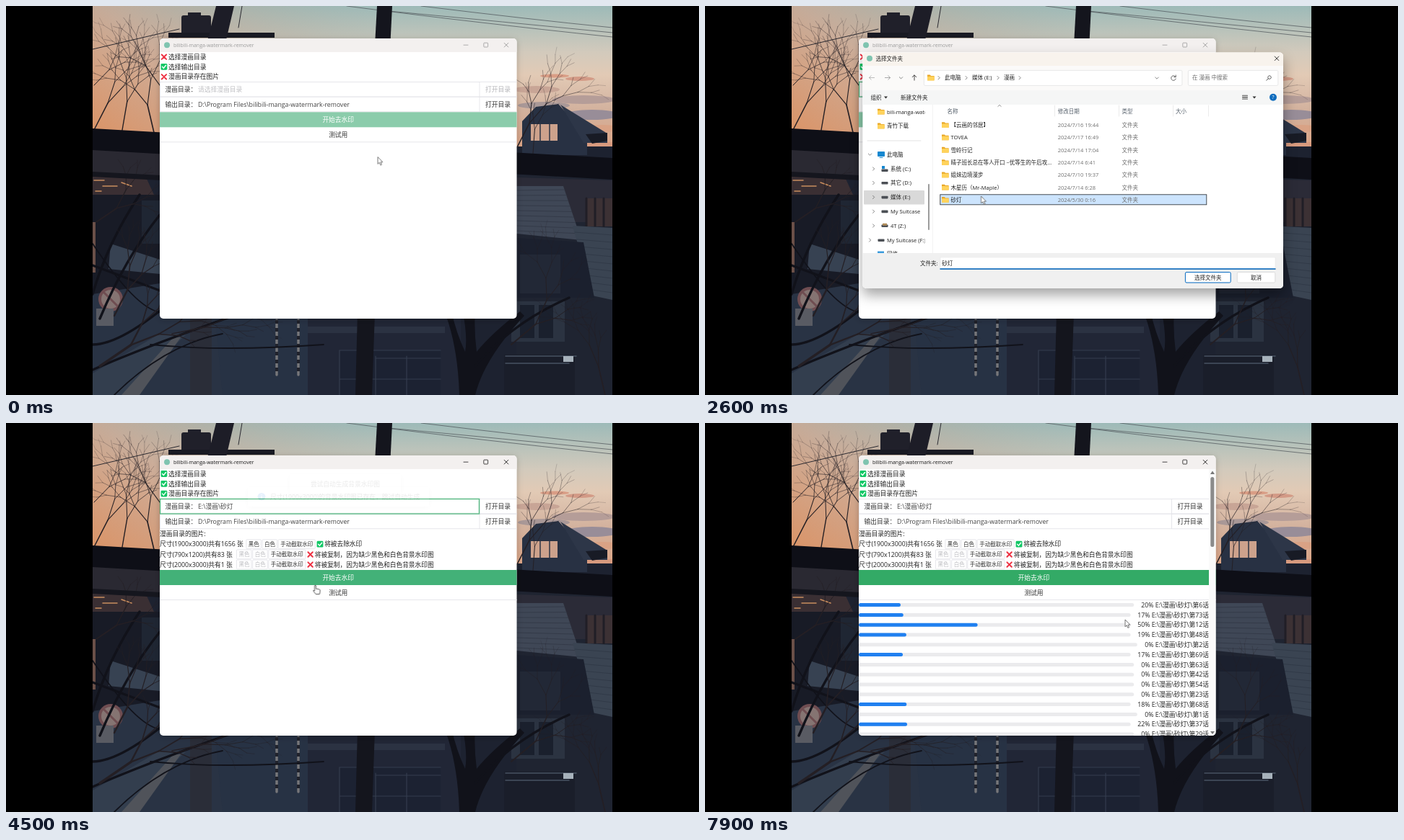
An HTML page for the animation above (8 s loop, 960 by 540 pixels).

```html
<!DOCTYPE html>
<html lang="zh-CN">
<head>
<meta charset="utf-8">
<title>bilibili-manga-watermark-remover</title>
<style>
html, body { margin: 0; width: 100%; height: 100%; overflow: hidden; background: #000; }
svg { display: block; width: 960px; height: 540px; }
text { font-family: "Open Sans", "Noto Sans CJK SC", "Noto Sans CJK", sans-serif; }
.anim { animation: 8s infinite; }
#dialog { transform-origin: 509.7px 228.3px; }
</style>
</head>
<body>
<svg id="stage" viewBox="0 0 960 540"></svg>
<script>
const LOOP = 8000, TICK = 100;
const BOOK = '砂灯';
let css = '';

// --- timeline: every segment advances in whole ticks
function timeline(id, stops) {
  const frames = stops.map(([ms, decl], i) => {
    const next = stops[i + 1] ? stops[i + 1][0] : LOOP;
    const n = Math.max(1, Math.round((next - ms) / TICK));
    return `${ms / LOOP * 100}%{${decl};animation-timing-function:steps(${n},end)}`;
  });
  css += `@keyframes ${id}{${frames.join('')}}#${id}{animation-name:${id}}`;
}
function show(id, from, to) {
  const stops = [[0, `opacity:${from ? 0 : 1}`]];
  if (from) stops.push([from - TICK, 'opacity:0'], [from, 'opacity:1']);
  if (to < LOOP) stops.push([to - TICK, 'opacity:1'], [to, 'opacity:0']);
  stops.push([LOOP, `opacity:${to < LOOP ? 0 : 1}`]);
  timeline(id, stops);
}

// --- drawing helpers
const anim = (id, body) => `<g id="${id}" class="anim">${body}</g>`;
const rect = (x, y, w, h, fill, extra = '') => `<rect x="${x}" y="${y}" width="${w}" height="${h}" fill="${fill}" ${extra}/>`;
const poly = (points, fill, extra = '') => `<polygon points="${points}" fill="${fill}" ${extra}/>`;
const line = (d, stroke, w = 1) => `<path d="${d}" fill="none" stroke="${stroke}" stroke-width="${w}" stroke-linecap="round"/>`;
const disc = (x, y, r, fill) => `<circle cx="${x}" cy="${y}" r="${r}" fill="${fill}"/>`;
const text = (x, cy, s, size = 8.75, fill = '#222', anchor = 'start') =>
  `<text x="${x}" y="${(cy + size * .37).toFixed(2)}" font-size="${size}" fill="${fill}" text-anchor="${anchor}">${s}</text>`;
const small = (x, cy, s, fill = '#222', anchor) => text(x, cy, s, 7.5, fill, anchor);
const clip = (id, x, y, w, h, r = 0) => `<clipPath id="${id}"><rect x="${x}" y="${y}" width="${w}" height="${h}" rx="${r}"/></clipPath>`;
const clipped = (id, body) => `<g clip-path="url(#${id})">${body}</g>`;
const close = (x, y, c, r = 3) => line(`M${x - r},${y - r}l${2 * r},${2 * r}m0,${-2 * r}l${-2 * r},${2 * r}`, c, .9);
const yes = (x, y) => rect(x, y - 4.4, 8.8, 8.8, '#12c765', 'rx="1.4"') + line(`M${x + 2},${y}l1.8,2l3.2,-4`, '#fff', 1.4);
const no = (x, y) => line(`M${x + 1.2},${y - 3}l6.4,6.4m0,-6.4l-6.4,6.4`, '#ee3344', 2);
const folder = (x, y) => `<path d="M${x},${y - 4}h3.8l1.2,1.3h4.6v6.4h-9.6z" fill="#e9a828"/>` + rect(x, y - 1.8, 9.6, 5.6, '#ffd35c', 'rx=".6"');
const chevron = (x, y, down) => line(down ? `M${x - 2.2},${y - 1}l2.2,2.2l2.2,-2.2` : `M${x - 1},${y - 2.2}l2.2,2.2l-2.2,2.2`, '#666', .8);

// --- scenery
let seed = 11;
const rand = () => (seed = seed * 16807 % 2147483647) / 2147483647;
function branch(x, y, angle, len, w) {
  if (len < 10) return '';
  const x2 = x + Math.cos(angle) * len, y2 = y + Math.sin(angle) * len;
  const fork = d => branch(x2, y2, angle + d * (.15 + rand() * .35), len * (.62 + rand() * .25), w * .7);
  return line(`M${x.toFixed(1)},${y.toFixed(1)}L${x2.toFixed(1)},${y2.toFixed(1)}`, '#241f24', w.toFixed(2)) + fork(-1) + fork(1);
}
function scenery() {
  const ink = '#11121a';
  let s = rect(120, 0, 720, 240, 'url(#sky)') + rect(120, 0, 400, 240, 'url(#glow)');
  // clouds
  const cloud = (x, y, rx, ry, c) => `<ellipse cx="${x}" cy="${y}" rx="${rx}" ry="${ry}" fill="${c}"/>`;
  s += cloud(760, 97, 20, 2.5, '#d99d85') + cloud(795, 101, 20, 3, '#d39a86') + cloud(735, 116, 32, 5, '#c8a596')
    + cloud(800, 130, 44, 6, '#b59d98') + cloud(745, 138, 36, 5, '#a99897') + cloud(812, 151, 38, 7, '#988d98')
    + cloud(825, 170, 30, 5, '#d9a285') + cloud(820, 194, 32, 6, '#d79a7e');
  // wires, transformer, poles
  s += line('M472,0Q640,22 840,43M530,7Q690,22 840,37M575,0Q720,18 840,30', '#4a5055', .7);
  s += rect(243, 13, 41, 31, '#20202a', 'rx="3"') + rect(252, 9, 18, 6, '#20202a') + rect(225, 37, 147, 7, '#191a23')
    + poly('291,0 316,0 302,60 276,60', '#1d1d27') + line('M327,0l-5,30M120,60L240,32', '#2a2930', 1);
  s += poly('514,0 535,0 508,540 484,540', '#14151d');
  // ground and houses
  s += rect(120, 195, 720, 345, '#1d2230') + poly('120,198 240,207 240,242 120,232', '#2a2932')
    + poly('120,232 195,240 205,262 120,264', '#3a2f33')
    + line('M122,242h14M134,250h20M160,245l14,5M124,257h8', '#c98d5d', 1.5)
    + poly('120,262 213,262 213,400 120,400', '#181b26') + poly('145,330 213,352 213,372 142,365', '#374252')
    + rect(120, 300, 4, 70, '#6b5048') + rect(188, 270, 25, 60, '#1f2633')
    + poly('120,400 213,385 300,434 420,434 420,540 120,540', '#293344')
    + poly('120,510 213,455 250,455 165,540 120,540', '#333e4e') + poly('160,540 232,460 242,460 185,540', '#50535a')
    + poly('290,434 420,434 420,540 300,540', '#273244');
  s += disc(145, 407, 17, '#6f4d51') + disc(145, 407, 13, '#857472') + line('M136,398l18,18', '#6f4d51', 3) + rect(125, 420, 24, 24, '#595b63');
  s += rect(255, 430, 30, 110, '#2a2d38');
  for (const x of [375, 405]) s += line(`M${x},436V512`, '#77777a', 3.4) + `<path d="M${x},436V512" stroke="#20222b" stroke-width="4" stroke-dasharray="5 6"/>`;
  s += rect(418, 434, 212, 106, '#212636') + rect(418, 445, 190, 9, '#2b3242') + rect(462, 478, 140, 62, '#1c2232')
    + line('M462,540V478H602M512,486V540M555,486V540M462,518H602M512,489H602', '#343d4e', 1.2) + poly('487,425 511,425 507,540 484,540', '#14151d');
  // right side
  s += rect(707, 235, 133, 305, '#1f2431') + poly('707,238 840,242 840,300 780,300 707,262', '#2b2b37')
    + poly('734,140 765,136 805,180 805,207 715,207 715,160', '#283143') + rect(727, 164, 37, 23, '#cda28c') + line('M740,164V187M753,164V187', '#2c3444', 1.5)
    + poly('768,137 833,177 833,190 800,190', '#2d3648') + poly('803,178 833,176 833,187 812,191', '#181b25')
    + poly('707,250 772,250 797,325 707,316', '#3f4756');
  for (let i = 0; i < 9; i++) s += line(`M707,${256 + i * 7}L${774 + i * 2.4},${255 + i * 7.6}`, '#313846', .8);
  s += rect(804, 267, 36, 39, '#3c3134') + line('M804,267V306M816,267V306M828,267V306', '#201e26', 3)
    + poly('785,305 840,308 840,408 812,402', '#3a4452');
  for (let i = 0; i < 9; i++) s += line(`M${788 + i * 3},${314 + i * 10}L840,${318 + i * 10}`, '#2f3846', .8);
  s += poly('707,322 800,328 815,405 707,405', '#1b202e') + rect(712, 345, 56, 54, '#222836')
    + rect(700, 410, 74, 56, '#2b3341') + rect(712, 415, 20, 46, '#1a202d') + rect(738, 415, 20, 46, '#1a202d')
    + rect(690, 484, 98, 56, '#1a1e2a') + line('M692,486H790M692,496H780', '#485363', 1.5) + rect(772, 486, 14, 8, '#a7b2bb');
  // trees
  s += `<path d="M606,420Q626,470 628,540H650Q662,490 718,430L712,424Q672,455 652,480Q648,450 650,420H632Q640,460 636,480Q624,455 616,420z" fill="${ink}"/>`;
  s += line('M650,500Q700,440 780,405M120,505Q200,470 330,425M120,470Q160,470 235,405M130,434Q165,350 213,290M120,400Q140,330 185,262M120,360L213,395', ink, 3.4)
    + line('M150,540Q220,470 300,455M200,470Q300,480 440,470M120,330Q180,420 213,425', ink, 1.8);
  for (const [x, y, a, len, w] of [[122, 172, -1.1, 42, 1.5], [160, 178, -1.4, 46, 1.4], [206, 180, -1.8, 44, 1.6], [213, 110, -2.2, 34, 1.2],
    [122, 110, -.8, 30, 1], [706, 200, -1.1, 42, 1.5], [730, 205, -1.5, 34, 1], [150, 430, -1.1, 40, 2.4], [125, 300, -.6, 34, 2],
    [130, 500, -.6, 52, 3.4], [230, 455, -.2, 46, 1.6], [700, 470, -.7, 44, 2], [830, 540, -1.8, 40, 1.6]]) s += branch(x, y, a, len, w);
  // crossing beam
  s += poly('120,170 840,211 840,241 120,200', '#0e0f17') + rect(120, 230, 95, 7, '#15161e', 'transform="rotate(3 120 230)"');
  return clipped('picture', s);
}

// --- main window
const DIM = '#9b9b9b', BORDER = '#e0e0e6';
function titleBar(color) {
  return text(232, 54.3, 'bilibili-manga-watermark-remover', 7, color)
    + line('M634,54.2h6', color, .8) + rect(661.8, 51.2, 5.8, 5.8, 'none', `stroke="${color}" stroke-width=".8" rx=".8"`) + close(693, 54.2, color, 2.8);
}
const checks = mark => ['选择漫画目录', '选择输出目录', '漫画目录存在图片']
  .map((s, i) => (i === 1 ? yes : mark)(214.5, 70.5 + i * 13.8) + text(225, 70.5 + i * 13.8, s)).join('');
function field(y, right, label, value, ready = true) {
  return rect(213.4, y, right - 51.5 - 213.4, 20.6, '#fff', `stroke="${BORDER}" stroke-width=".8"`) + line(`M${right - 51},${y + 20.6}H${right}M${right - 51},${y}H${right}`, BORDER, .8)
    + text(220.5, y + 10.3, label, 8.75, '#333') + text(266, y + 10.3, value, 8.75, ready ? '#444' : '#c0c0c4')
    + text(right - 26, y + 10.3, '打开目录', 8.75, ready ? '#333' : '#b4b4b8', 'middle');
}
const fields = (right, path, ready) => field(105.4, right, '漫画目录：', path, ready)
  + field(126.2, right, '输出目录：', 'D:\\Program Files\\bilibili-manga-watermark-remover');
function actions(y, right, color, id = '') {
  const mid = (213 + right) / 2;
  return `<rect x="213" y="${y}" width="${right - 213}" height="21" fill="${color}" ${id && `id="${id}" class="anim"`}/>`
    + text(mid, y + 10.3, '开始去水印', 8.75, '#fff', 'middle') + text(mid, y + 31.3, '测试用', 8.75, '#333', 'middle')
    + line(`M213,${y + 41.5}H${right}`, BORDER, .8);
}
function sizeRow(cy, label, x, ok) {
  const tag = (dx, s, w, on) => rect(x + dx, cy - 6.4, w, 12.8, '#fff', `stroke="${BORDER}" stroke-width=".8" rx="1"`) + small(x + dx + 3, cy, s, on ? '#333' : '#bcbcc0');
  const msg = ok ? '将被去除水印' : '将被复制，因为缺少黑色和白色背景水印图';
  return text(213, cy, label) + tag(0, '黑色', 20.5, ok) + tag(22.3, '白色', 20.5, ok) + tag(44.4, '手动截取水印', 51, true)
    + (ok ? yes : no)(x + 97.8, cy) + text(x + 108.4, cy, msg, 8.68);
}
const sizes = () => text(213, 154, '漫画目录的图片:') + sizeRow(168.2, '尺寸(1900x3000)共有1656 张', 332.8, true)
  + sizeRow(182.3, '尺寸(790x1200)共有83 张', 319.4) + sizeRow(196.4, '尺寸(2000x3000)共有1 张', 319.4);

// chapter, percent, drawn share of the bar
const jobs = [[6, 20, .152], [73, 17, .164], [12, 50, .437], [48, 19, .175], [2, 0, 0], [69, 17, .162], [63, 0, 0],
  [42, 0, 0], [54, 0, 0], [23, 0, 0], [68, 18, .176], [1, 0, 0], [37, 22, .178], [29, 0, 0]];
const jobLabel = (chapter, pct) => `${pct}% E:\\漫画\\${BOOK}\\第${chapter}话`;
const jobRows = () => jobs.map(([chapter], i) => {
  const cy = 252.6 + i * 13.8;
  return rect(213, cy - 2.5, 380, 5, '#ebebed', 'rx="2.5" class="track"') + rect(213, cy - 2.5, 0, 5, '#2080f0', 'rx="2.5" class="fill"')
    + text(698, cy, jobLabel(chapter, 0), 8.75, '#222', 'end').replace('<text', '<text class="job"');
}).join('');
const scrollBar = () => rect(698, 64, 10, 370, '#fafafa') + rect(700.3, 75, 5, 97, '#8b8b8b', 'rx="2.5"')
  + poly('700,71 706,71 703,66.5', '#777') + poly('700,428 706,428 703,432', '#777');

const toast = (x, w, body) => rect(x, 71, w, 26.6, '#fff', 'rx="2" filter="url(#soft)"') + body;
function notice(y, size) {
  return rect(472, y, 226, 85, '#fff', 'rx="2" filter="url(#soft)"') + disc(490.5, y + 17.6, 7, '#f0a020') + line(`M490.5,${y + 13.8}v4.4m0,3v.1`, '#fff', 1.5)
    + text(506.5, y + 17, `自动生成背景水印图(${size})失败`, 10, '#333') + close(684, y + 15.6, '#666')
    + small(506.5, y + 36.2, `找不到尺寸为(${size})的黑色背景水印图`, '#767c82') + small(506.5, y + 47.8, `找不到尺寸为(${size})的白色背景水印图`, '#767c82')
    + text(506.5, y + 67.6, '请尝试手动截取水印', 8.75, '#333');
}
function mainWindow() {
  const path = `E:\\漫画\\${BOOK}`;
  const idle = checks(no) + fields(707.5, '请选择漫画目录', false) + actions(147.3, 707.5, '#8bccab');
  const ready = checks(yes) + fields(707.5, path) + sizes() + actions(204, 707.5, '#18a058', 'start');
  const running = checks(yes) + fields(698, path) + sizes() + actions(204, 698, '#33aa66') + jobRows() + scrollBar();
  const focus = rect(213.5, 105.4, 442, 20.6, 'none', 'stroke="#18a058" stroke-opacity=".2" stroke-width="2.4"')
    + rect(213.5, 105.4, 442, 20.6, 'none', 'stroke="#36ad6a" stroke-width=".8"');
  return rect(213, 45, 494.5, 389, '#fff', 'rx="5" filter="url(#soft)"') + clipped('window', rect(213, 45, 495, 19, '#f3f0ef') + disc(223, 54.3, 4, '#7fc4b0')
    + anim('inactive', titleBar(DIM)) + anim('active', titleBar('#1b1b1b'))
    + anim('idle', idle) + anim('ready', ready) + anim('focus', focus) + anim('running', rect(213, 64, 495, 370, '#fff') + running)
    + anim('trying', toast(393, 154, text(470, 84.3, '尝试自动生成背景水印图', 8.75, '#444', 'middle')))
    + anim('exists', toast(335, 251, disc(354, 84.3, 5.4, '#2080f0') + line('M354,83.6v3m0,-5.2v.1', '#fff', 1.2)
      + text(366, 84.3, '尺寸(1900x3000)的背景水印图已存在，跳过自动生成', 8.75, '#444')))
    + anim('notice1', notice(249, '790x1200')) + anim('notice2', notice(342, '2000x3000')));
}

// --- folder dialog
const row = i => 165.2 + i * 17.32;
const fileRow = (i, name, date) => folder(328, row(i)) + small(340.5, row(i), name) + small(488.7, row(i), date, '#6f6f6f') + small(577.5, row(i), '文件夹', '#6f6f6f');
const drive = (x, y) => rect(x, y - 1.6, 9, 3.6, '#4b4f55', 'rx=".8"');
const crumb = (x, s) => small(x, 99.7, s);
function sidebar() {
  const disks = [['系统 (C:)', 226], ['其它 (D:)', 245.6], ['媒体 (E:)', 265.4], ['My Suitcase', 285.2], ['4T (Z:)', 305]];
  return rect(220, 256, 84, 19.4, '#d9d9d9', 'rx="1"') + folder(239, 146.8) + small(252, 146.8, 'bili-manga-watermark') + folder(239, 166.6) + small(252, 166.6, '青竹下载')
    + line('M225,187H299', '#dcdcdc', .8) + chevron(228.5, 206, true) + rect(239, 202, 10, 7, '#1688d0', 'rx=".8"') + line('M242,210.4h4', '#1688d0', 1) + small(252, 206, '此电脑')
    + disks.map(([s, y]) => chevron(233.5, y) + drive(244.5, y + (y === 226 ? 2 : 0)) + small(257, y, s)).join('') + rect(245, 222, 4, 4, '#1688d0')
    + rect(246, 301.8, 6, 3, '#b08c5a') + chevron(228.5, 325) + drive(239.5, 325) + small(252, 325, 'My Suitcase (F:)') + rect(239, 340.5, 9, 6, '#3a9bdc') + small(252, 344.4, '网络');
}
function dialog() {
  const books = [['【云画的邻居】', '2024/7/16 19:44'], ['TOVEA', '2024/7/17 16:49'], ['雪岭行记', '2024/7/14 17:04'], ['晴子班长总在等人开口 ~优等生的午后攻...', '2024/7/14 6:41'],
    ['姐妹边境漫步', '2024/7/10 19:37'], ['木星历（Mr-Maple）', '2024/7/14 6:28'], [BOOK, '2024/5/30 0:16']];
  const chapters = Array.from({ length: 11 }, (_, i) => fileRow(i, `第${i + 1}话`, '2024/5/26 6:01')).join('');
  const picked = rect(325.8, 261.8, 369, 14, '#cce4fd', 'stroke="#34393f" stroke-width=".9"');
  const nav = (x, d, c) => line(`M${x},99.5${d}`, c, .9);
  const left = 'm-3.6,0h7.2m-7.2,0l2.8,-2.8m-2.8,2.8l2.8,2.8', right = 'm3.6,0h-7.2m7.2,0l-2.8,-2.8m2.8,2.8l-2.8,2.8', up = 'm0,3.6v-7.2l-2.8,2.8m2.8,-2.8l2.8,2.8';
  const root = nav(231, left, '#b5b5b5') + small(675, 99.7, '在 漫画 中搜索', '#6b6b6b');
  const inner = nav(231, left, '#333') + small(675, 99.7, `在 ${BOOK} 中搜索`, '#6b6b6b') + crumb(444, BOOK) + chevron(466, 99.7) + rect(795.4, 148, 1.6, 24, '#8a8a8a', 'rx=".8"');
  let s = rect(218.5, 64.5, 582.5, 327.5, '#fff', 'rx="5" filter="url(#deep)"') + clipped('sheet', rect(218, 64, 584, 19, '#f8f3ed') + rect(218, 83, 584, 34, '#fbfaf9')
    + rect(218, 117, 584, 20, '#f5f6f6') + rect(218, 343, 584, 50, '#f0f0f0'));
  s += disc(228, 72.8, 4, '#7fc4b0') + small(236.5, 72.8, '选择文件夹') + close(792, 72.8, '#222', 2.8)
    + nav(253, right, '#a0a0a0') + chevron(271.5, 99.7, true) + nav(290, up, '#333')
    + rect(303.4, 89.4, 357.5, 21, '#fff', 'stroke="#e2e2e2" stroke-width=".8" rx="1.5"') + rect(669.4, 89.4, 124.4, 21, '#fff', 'stroke="#e2e2e2" stroke-width=".8" rx="1.5"')
    + folder(308, 99.6) + crumb(332, '此电脑') + crumb(370, '媒体 (E:)') + crumb(414, '漫画') + [324, 362, 406, 436].map(x => chevron(x, 99.7)).join('')
    + chevron(626, 100, true) + line('M652,98.6a3.3,3.3 0 1 0 .2,2.4m0,-5v2.6h-2.4', '#555', .9) + line('M780.2,100.6a2.3,2.3 0 1 1 .6,.5m-.4,-.4l-2.6,2.6', '#444', .9);
  s += small(229.5, 127, '组织') + small(271, 127, '新建文件夹') + poly('248,125.5 253,125.5 250.5,128.5', '#333')
    + line('M744.5,124.2h7m-7,2.4h7m-7,2.4h7', '#444', 1.1) + poly('758.5,125.5 763.5,125.5 761,128.5', '#333') + disc(787, 126.8, 5, '#0f6cbd') + text(787, 126.8, '?', 7, '#fff', 'middle');
  s += clipped('side', sidebar()) + rect(309.2, 247, 1.6, 64, '#858585', 'rx=".8"') + line('M315.5,137V343', '#f0f0f0', .8)
    + [[335.5, '名称'], [488.7, '修改日期'], [577.5, '类型'], [652, '大小']].map(([x, t]) => small(x, 145.8, t, '#56606b')).join('')
    + line('M484.5,138v15m89,-15v15m75,-15v15m49,-15v15', '#e6e6e6', .8) + line('M405.8,139.4l2.2,-2l2.2,2', '#777', .8);
  s += clipped('list', anim('picked', picked) + anim('books', books.map(([n, d], i) => fileRow(i, n, d)).join('')) + anim('chapters', chapters)) + anim('rootNav', root) + anim('innerNav', inner);
  s += small(322.5, 357.2, '文件夹:', '#222', 'end') + rect(326, 349, 464, 16.4, '#fff', 'stroke="#e6e6e6" stroke-width=".6"') + line('M326,365.2H790', '#9a9a9a', .8)
    + anim('editing', line('M326,365H790', '#0067c0', 1.4)) + anim('caret', line('M328.2,352v10', '#222', .7)) + anim('chosen', small(328.2, 357.2, BOOK))
    + rect(665.4, 369.6, 62.8, 14.4, '#fff', 'rx="1.6" stroke="#0067c0" stroke-width="1"') + small(696.8, 376.8, '选择文件夹', '#222', 'middle')
    + rect(737.3, 369.6, 52.5, 14.4, '#fff', 'rx="1.6" stroke="#d6d6d6" stroke-width=".8"') + small(763.5, 376.8, '取消', '#222', 'middle');
  return anim('dialog', s);
}

const pointer = () => anim('cursor',
  anim('arrow', '<path d="M0,0V9.8l2.2,-2l1.6,3.6l1.7,-.7l-1.6,-3.5h3z" fill="#fff" stroke="#555" stroke-width=".8"/>')
  + anim('hand', '<path d="M-1,1q1,-1.6 2,0v4.2l1.6,.1l1.7,.3l1.6,.5q1,.3 .8,2l-.8,4.5h-5.2l-3.2,-4q-.8,-1.4 .5,-1.3l1,.9z" fill="#fff" stroke="#333" stroke-width=".8"/>'));

// --- timing
const at = (x, y) => `transform:translate(${x}px,${y}px)`;
timeline('cursor', [[0, at(515, 209.5)], [400, at(515, 209.5)], [1000, at(437, 112)], [1700, at(437, 112)], [2400, at(382.5, 264)], [2900, at(382.5, 264)],
  [3600, at(647.5, 349.5)], [3900, at(694, 376)], [4000, at(694, 376)], [4500, at(428.5, 225)], [4800, at(428.5, 225)], [5700, at(672.8, 274)], [5900, at(684, 265)],
  [6000, at(684, 265)], [6400, at(684, 357)], [6500, at(684, 357)], [7100, at(472, 214)], [7300, at(472, 214)], [7900, at(582, 273)], [8000, at(582, 273)]]);
timeline('arrow', [[0, 'opacity:1'], [4400, 'opacity:1'], [4500, 'opacity:0'], [4800, 'opacity:0'], [4900, 'opacity:1'], [7000, 'opacity:1'], [7100, 'opacity:0'], [7300, 'opacity:0'], [7400, 'opacity:1'], [8000, 'opacity:1']]);
timeline('hand', [[0, 'opacity:0'], [4400, 'opacity:0'], [4500, 'opacity:1'], [4800, 'opacity:1'], [4900, 'opacity:0'], [7000, 'opacity:0'], [7100, 'opacity:1'], [7300, 'opacity:1'], [7400, 'opacity:0'], [8000, 'opacity:0']]);
const pop = (o, s) => `opacity:${o};transform:scale(${s})`;
timeline('dialog', [[0, pop(0, .9)], [1400, pop(0, .9)], [1500, pop(.6, .93)], [1600, pop(1, .971)], [1700, pop(1, .99)], [1800, pop(1, 1)],
  [4100, pop(1, 1)], [4200, pop(.5, .95)], [4300, pop(0, .9)], [8000, pop(0, .9)]]);
show('inactive', 0, 4300); show('active', 4300, LOOP);
show('idle', 0, 4400); show('ready', 4400, LOOP); show('running', 7300, LOOP);
show('focus', 1000, 7300);
show('picked', 2500, 2900); show('books', 0, 2900); show('chapters', 2900, LOOP);
show('rootNav', 0, 2900); show('innerNav', 2900, LOOP);
show('editing', 0, 2900); show('caret', 0, 2200); show('chosen', 2500, LOOP);
timeline('start', [[0, 'fill:#8bccab'], [4400, 'fill:#8bccab'], [4500, 'fill:#43b178'], [4600, 'fill:#36ad6a'], [4800, 'fill:#36ad6a'], [5100, 'fill:#18a058'], [6900, 'fill:#18a058'], [7200, 'fill:#36ad6a'], [8000, 'fill:#36ad6a']]);
const slide = (o, x, y) => `opacity:${o};${at(x, y)}`;
timeline('trying', [[0, 'opacity:0'], [4400, 'opacity:0'], [4500, 'opacity:.1'], [4700, 'opacity:0'], [8000, 'opacity:0']]);
timeline('exists', [[0, slide(0, 0, 18)], [4400, slide(0, 0, 18)], [4500, slide(.1, 0, 18)], [4800, slide(1, 0, 0)], [7500, slide(1, 0, 0)], [7800, slide(0, 0, -8)], [8000, slide(0, 0, -8)]]);
const notify = (id, leave) => timeline(id, [[0, slide(0, 230, 0)], [4500, slide(0, 230, 0)], [4900, slide(1, 0, 0)], [leave, slide(1, 0, 0)], [leave + 300, slide(0, 230, 0)], [8000, slide(0, 230, 0)]]);
notify('notice1', 6000); notify('notice2', 6500);

// --- assemble
const stop = (o, c, a = 1) => `<stop offset="${o}" stop-color="${c}" stop-opacity="${a}"/>`;
const shadow = (id, dy, blur, a) => `<filter id="${id}" x="-20%" y="-40%" width="140%" height="200%"><feDropShadow dx="0" dy="${dy}" stdDeviation="${blur}" flood-opacity="${a}"/></filter>`;
const stage = document.getElementById('stage');
stage.innerHTML = `<defs><linearGradient id="sky" x2="0" y2="1">${stop(0, '#9dbab8')}${stop(.27, '#d3cabc')}${stop(.4, '#e2cab5')}${stop(.6, '#d3b29e')}${stop(.9, '#dd9e7b')}</linearGradient>
<linearGradient id="glow" x1="0" y1=".8" x2="1" y2="0">${stop(0, '#dc9263')}${stop(.4, '#cba893', .85)}${stop(1, '#a9aea6', 0)}</linearGradient>
${shadow('soft', 2, 4, .22)}${shadow('deep', 9, 9, .36)}
${clip('picture', 120, 0, 720, 540)}${clip('window', 213, 45, 494.5, 389, 5)}${clip('sheet', 218.5, 64.5, 582.5, 327.5, 5)}${clip('side', 219, 137, 85.5, 206)}${clip('list', 316, 154, 478, 189)}</defs>`
  + rect(0, 0, 960, 540, '#000') + scenery() + mainWindow() + dialog() + pointer();
document.head.appendChild(document.createElement('style')).textContent = css;

const all = c => [...stage.querySelectorAll(c)];
const tracks = all('.track'), fills = all('.fill'), labels = all('.job');
const clock = document.getElementById('cursor').getAnimations()[0];
const LEAD = 20; // covers the wait for the next repaint
function tick() {
  const t = Math.floor(((clock.currentTime || 0) + LEAD) % LOOP / TICK) * TICK;
  const k = Math.min(1, Math.max(0, (t - 7200) / 700));
  jobs.forEach(([chapter, percent, share], i) => {
    const pct = Math.round(percent * k);
    const width = 395 - 4.6 * `${pct}${chapter}`.length;
    tracks[i].setAttribute('width', width);
    fills[i].setAttribute('width', width * share * k);
    labels[i].textContent = jobLabel(chapter, pct);
  });
  requestAnimationFrame(tick);
}
tick();
</script>
</body>
</html>
```
